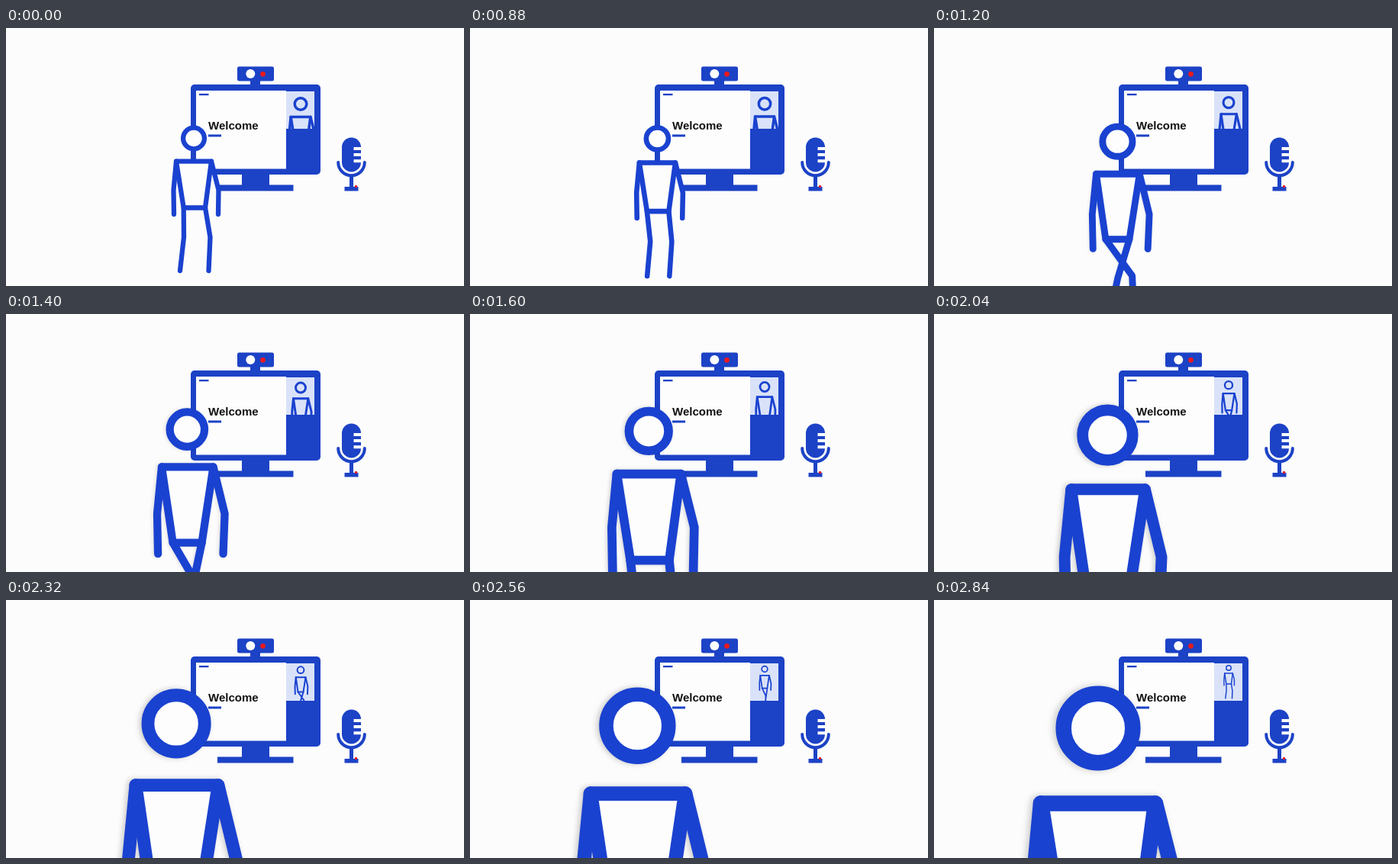
Recreate the animation shown at these times as an HTML page. Size 600 px wide and 338 px high, loop 4.6 s.

```html
<!DOCTYPE html>
<html lang="en">
<head>
<meta charset="utf-8">
<title>Walking up to a video call</title>
<style>
  html, body { margin: 0; height: 100%; overflow: hidden; background: #fcfcfc; }
  svg { display: block; width: 100%; height: 100%; }
  .person { stroke: #1a42d0; stroke-width: 6.3; stroke-linecap: round; stroke-linejoin: round; }
  .limb { fill: none; }
  text { font: bold 15px "Liberation Sans", Arial, sans-serif; fill: #111; }
</style>
</head>
<body>
<svg viewBox="0 0 600 338">
  <clipPath id="view"><rect x="367" y="83" width="37" height="49"/></clipPath>

  <g fill="#1c42c6">
    <!-- webcam -->
    <rect x="303" y="50.5" width="48" height="19" rx="2.5"/>
    <rect x="320" y="69" width="13" height="6"/>
    <circle cx="320.3" cy="60" r="6" fill="#fff"/>
    <circle cx="336.5" cy="60.3" r="3.4" fill="#e8191f"/>

    <!-- monitor -->
    <rect x="242" y="74" width="170" height="118" rx="5"/>
    <rect x="249" y="82" width="118" height="102.5" fill="#fdfdfd"/>
    <rect x="367" y="83" width="37" height="49" fill="#d9e2f8"/>
    <rect x="309" y="191" width="36" height="16"/>
    <rect x="277" y="205.5" width="99.5" height="8"/>
    <rect x="253" y="86" width="12.5" height="2.3"/>
    <rect x="265" y="139.5" width="17" height="3"/>

    <!-- microphone -->
    <rect x="440" y="143.5" width="25" height="45" rx="12.5"/>
    <path d="M455.5 158h10M455.5 166h10M455.5 174.3h10" stroke="#fcfcfc" stroke-width="4"/>
    <path d="M435.2 176a17.3 17.3 0 0 0 34.6 0" fill="none" stroke="#1c42c6" stroke-width="4" stroke-linecap="round"/>
    <rect x="450" y="193" width="5" height="16"/>
    <rect x="443.5" y="208" width="18" height="5.5"/>
    <circle cx="458.5" cy="207.5" r="1.7" fill="#e8191f"/>
  </g>
  <text x="265" y="132.7">Welcome</text>

  <g clip-path="url(#view)"><g id="mini" class="person" fill="none"></g></g>
  <g id="walker" class="person" fill="#fdfdfd"></g>
</svg>
<script>
const LOOP = 4600, START = 840, WALK = 2000, TICK = 40;
const mini = document.getElementById('mini');
const walker = document.getElementById('walker');

// Each joint: standing x, y, then x, y with the legs crossed; origin is the head.
const joints = {
  shoulderL: [-23, 30.2, -19.8, 30.2], shoulderR: [23, 30.2, 20.5, 30.2],
  elbowL: [-26.5, 67.8, -23.5, 67.8],  elbowR: [32.5, 67.8, 29.6, 67.8],
  handL: [-26, 99.5, -22.8, 100],      handR: [32, 99.5, 28.2, 100],
  hipL: [-13.3, 91, -11, 91],          hipR: [15, 91, 11, 91],
  kneeL: [-13, 129.5, 14, 125],        kneeR: [21.5, 129.5, 0, 127],
  footL: [-18, 173.5, 16, 165],        footR: [19.5, 173.5, -8, 165]
};

function body(cross) {
  const line = names => 'M' + names.split(' ').map(n => {
    const [x, y, u, v] = joints[n];
    return [x + (u - x) * cross, y + (v - y) * cross];
  }).join('L');
  const limbs = ['L', 'R'].map(s =>
    line(`shoulder${s} elbow${s} hand${s}`) + line(`hip${s} knee${s} foot${s}`)).join('');
  return `<path class="limb" d="${limbs}"/>
    <path d="${line('shoulderL shoulderR hipR hipL')}Z"/><circle r="13.9"/>`;
}

const place = (el, x, y, scale) =>
  el.setAttribute('transform', `translate(${x} ${y}) scale(${scale})`);

function draw(now) {
  const t = Math.floor(now % LOOP / TICK) * TICK;
  const p = Math.min(1, Math.max(0, (t - START) / WALK));
  // Two steps: a short one, then a longer one.
  const step = p < 0.4 ? p / 0.4 : (p - 0.4) / 0.6;
  mini.innerHTML = walker.innerHTML = body(Math.sin(Math.PI * step));
  place(walker, 246 - 31 * p, 144.5 + 23.5 * p, 1 + 2.26 * p);
  place(mini, 386, 99.5 - 10.5 * p, 0.56 - 0.33 * p);
  walker.style.filter = `drop-shadow(-0.5px 0.5px 1.3px rgba(0,0,0,${0.2 * Math.min(1, p * 2)}))`;
}

let origin;
function frame(now) {
  origin ??= now;
  draw(now - origin);
  requestAnimationFrame(frame);
}
draw(0);
requestAnimationFrame(frame);
</script>
</body>
</html>
```
